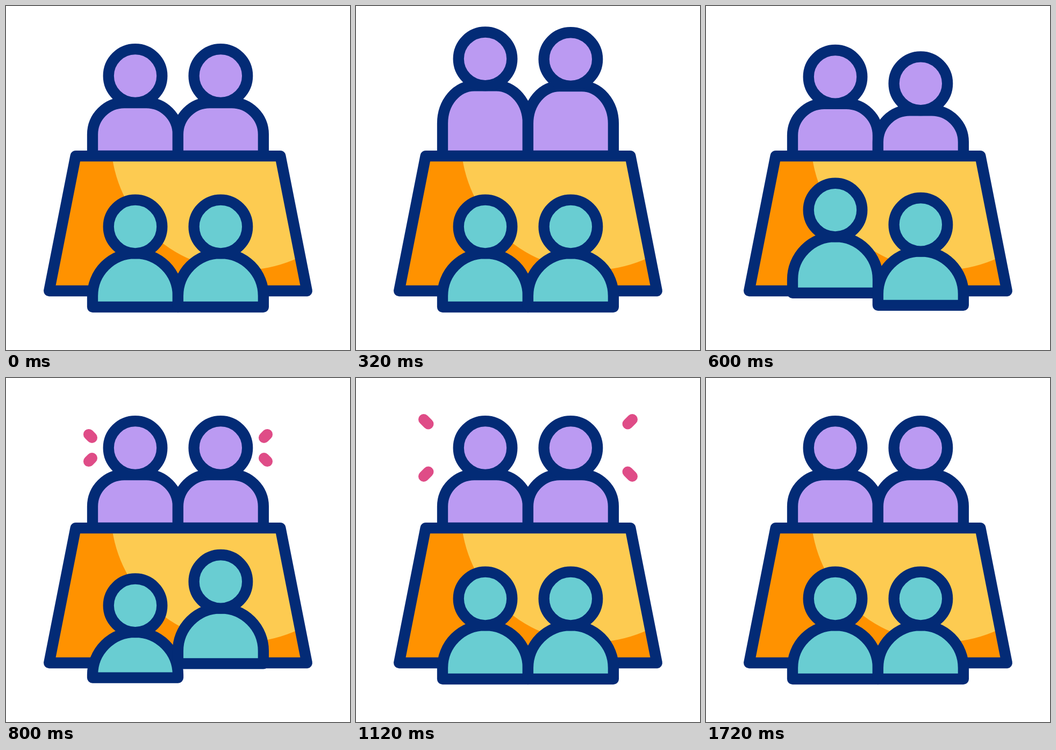
An HTML page with a canvas that plays this animation: 640x640 px, repeating every 2 s.

```html
<!DOCTYPE html>
<html lang="en">
<head>
<meta charset="utf-8">
<title>Meeting table</title>
<style>
  html, body { margin: 0; width: 100%; height: 100%; overflow: hidden; background: #fff; }
  canvas { display: block; width: 100vmin; height: 100vmin; }
</style>
</head>
<body>
<canvas id="stage" width="640" height="640"></canvas>
<script>
const ctx = document.getElementById('stage').getContext('2d');
const LOOP = 2000, STEP = 40, LINE = 20.3;
const NAVY = '#032b76', PURPLE = '#bb9af2', TEAL = '#69cdd2';
const ORANGE = '#ff9200', YELLOW = '#fdcb51', PINK = '#df4c87';
const LEFT_X = 240.5, RIGHT_X = 399.4;

function ease(t, start, end) {
  const p = Math.min(1, Math.max(0, (t - start) / (end - start)));
  return (1 - Math.cos(Math.PI * p)) / 2;
}

// Up, down into a squash, then back to rest
function hop(t) {
  const rise = ease(t, 80, 280), fall = ease(t, 280, 450);
  return {
    head: -39 * rise + 56 * fall - 17 * ease(t, 450, 640),
    base: -33 * (rise - fall)
  };
}

function paint(path, fill) {
  ctx.fillStyle = fill;
  ctx.fill(path);
  ctx.strokeStyle = NAVY;
  ctx.lineWidth = LINE;
  ctx.stroke(path);
}

function head(x, y, fill) {
  const path = new Path2D();
  path.arc(x, y, 49.8, 0, Math.PI * 2);
  paint(path, fill);
}

function body(x, top, shoulder, bottom, rx, fill) {
  const half = 79.5, ry = shoulder - top;
  const path = new Path2D();
  path.moveTo(x - half, bottom);
  path.lineTo(x - half, shoulder);
  path.ellipse(x - half + rx, shoulder, rx, ry, 0, Math.PI, Math.PI * 1.5);
  path.ellipse(x + half - rx, shoulder, rx, ry, 0, Math.PI * 1.5, Math.PI * 2);
  path.lineTo(x + half, bottom);
  path.closePath();
  paint(path, fill);
}

function backPerson(x, t) {
  const dy = hop(t).head;
  const shoulder = 239 + dy * (dy < 0 ? 0.65 : 1);
  body(x, 180 + dy, shoulder, 279, 59, PURPLE);
  head(x, 130 + dy, PURPLE);
}

function frontPerson(x, t) {
  const move = hop(t);
  body(x, 460 + move.head, 539.5 + move.head, 560 + move.base, 79.5, TEAL);
  head(x, 410.5 + move.head, TEAL);
}

function table() {
  const path = new Path2D('M129.6 279.2H510.4L559.8 530H80.2Z');
  ctx.fillStyle = ORANGE;
  ctx.fill(path);
  ctx.save();
  ctx.clip(path);
  ctx.fillStyle = YELLOW;
  ctx.beginPath();
  ctx.arc(440, 246.5, 245, 0, Math.PI * 2);
  ctx.fill();
  ctx.restore();
  ctx.strokeStyle = NAVY;
  ctx.lineWidth = LINE;
  ctx.stroke(path);
}

// Four diagonal dashes shooting outwards around a centre line
function sparks(cy, t, start) {
  const front = ease(t, start, start + 360);
  const tail = ease(t, start + 180, start + 540);
  if (front - tail < 0.001) return;
  ctx.strokeStyle = PINK;
  ctx.lineWidth = 20;
  ctx.beginPath();
  for (const sx of [-1, 1]) for (const sy of [-1, 1]) {
    const at = p => [320 + sx * (160 + 34 * p), cy + sy * (19 + 34 * p)];
    ctx.moveTo(...at(tail));
    ctx.lineTo(...at(front));
  }
  ctx.stroke();
}

function draw(t) {
  ctx.fillStyle = '#fff';
  ctx.fillRect(0, 0, 640, 640);
  ctx.lineJoin = ctx.lineCap = 'round';
  backPerson(LEFT_X, t);
  backPerson(RIGHT_X, t - 100);
  table();
  sparks(130, t, 700);
  sparks(415, t, 1180);
  frontPerson(LEFT_X, t - 380);
  frontPerson(RIGHT_X, t - 480);
}

const began = performance.now();
function tick() {
  const t = (performance.now() - began) % LOOP;
  draw(Math.floor(t / STEP) * STEP);
  requestAnimationFrame(tick);
}
tick();
</script>
</body>
</html>
```
